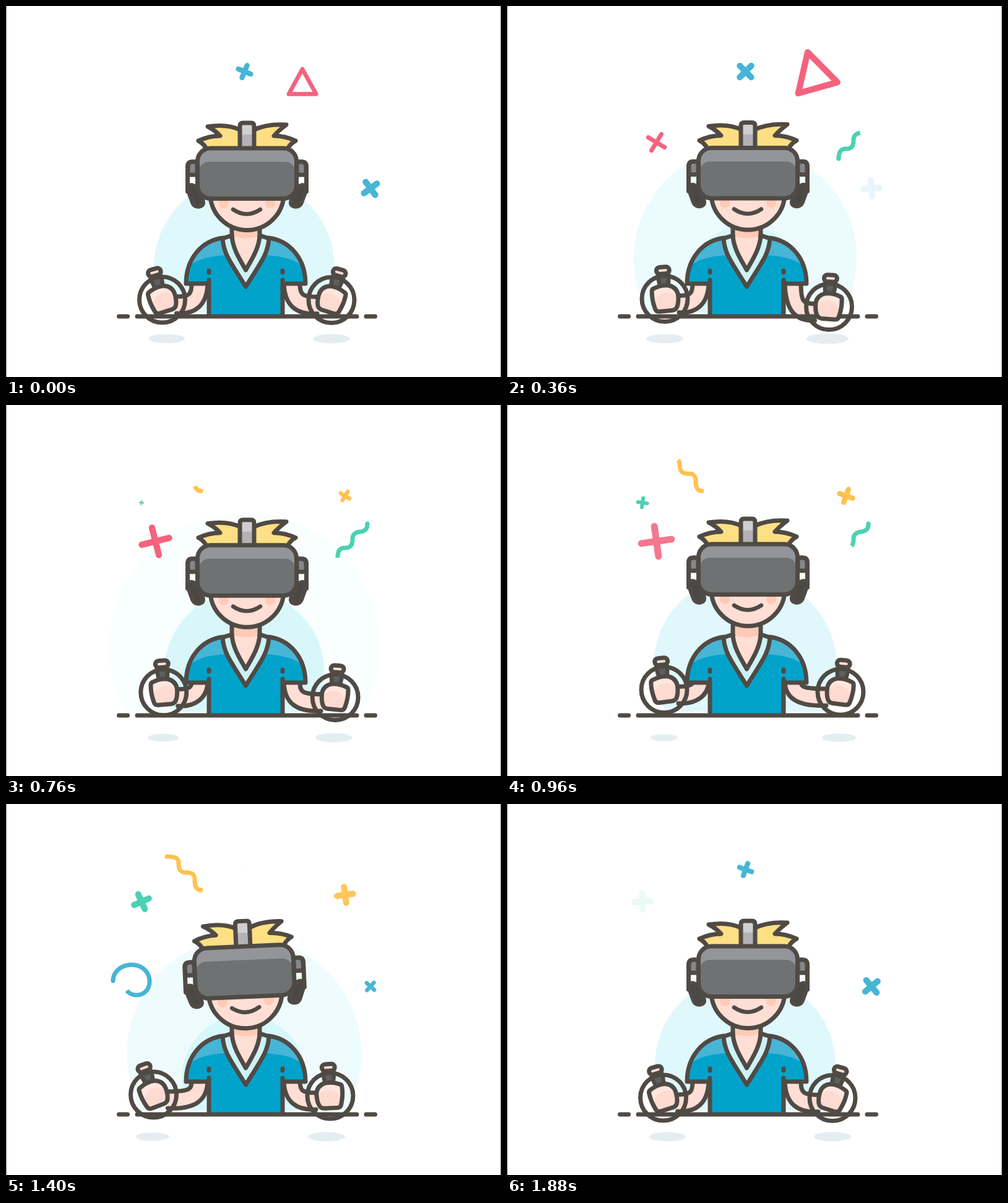
Animation of 800 by 600 pixels, one loop 1920 ms. Source, as an HTML page with a canvas:

```html
<!DOCTYPE html>
<html lang="en">
<head>
<meta charset="utf-8">
<title>VR player</title>
<style>
html, body { margin: 0; width: 100%; height: 100%; overflow: hidden; background: #fff; }
canvas { display: block; }
</style>
</head>
<body>
<canvas id="c" width="800" height="600"></canvas>
<script>
const g = document.getElementById('c').getContext('2d');
const LOOP = 1920, CYCLE = 1880;
const INK = '#504a45', SKIN = '#ffded5', BLUSH = '#ffcab6';
const BLUE = '#47b5d5', PINK = '#f4637e', GREEN = '#4bd1b3', YELLOW = '#ffc250';
const TIMES = [0, 360, 600, 960, 1400, 1720];

const clamp = v => Math.max(0, Math.min(1, v));
const span = (t, a, b) => clamp((t - a) / (b - a));
const ease = p => p * p * (3 - 2 * p);
const easeOut = p => 1 - (1 - p) ** 2;

// Smooth periodic curve through one value per entry of TIMES.
function pose(t, vals) {
  const n = TIMES.length;
  const wrap = i => (i + n) % n;
  const slope = i => {
    const a = wrap(i), b = wrap(i + 1);
    return (vals[b] - vals[a]) / ((TIMES[b] - TIMES[a] + CYCLE) % CYCLE);
  };
  const tangent = i => {
    const a = slope(i - 1), b = slope(i);
    return a * b > 0 ? 2 * a * b / (a + b) : 0;
  };
  t %= CYCLE;
  let i = n - 1;
  while (TIMES[i] > t) i--;
  const j = wrap(i + 1), h = (i === n - 1 ? CYCLE : TIMES[j]) - TIMES[i], u = (t - TIMES[i]) / h;
  const u2 = u * u, u3 = u2 * u;
  return (2 * u3 - 3 * u2 + 1) * vals[i] + (u3 - 2 * u2 + u) * h * tangent(i)
    + (3 * u2 - 2 * u3) * vals[j] + (u3 - u2) * h * tangent(j);
}

// Piecewise linear value from [time, value] pairs.
function line(t, keys) {
  for (let i = 1; i < keys.length; i++) {
    const [a, v] = keys[i - 1], [b, w] = keys[i];
    if (t < b) return v + (w - v) * span(t, a, b);
  }
  return keys[keys.length - 1][1];
}

function shape(d, fill, width = 7, color = INK) {
  const p = typeof d === 'string' ? new Path2D(d) : d;
  if (fill) { g.fillStyle = fill; g.fill(p); }
  if (width) { g.strokeStyle = color; g.lineWidth = width; g.stroke(p); }
}

function box(x, y, w, h, r) {
  const p = new Path2D();
  p.roundRect(x, y, w, h, r);
  return p;
}

function oval(x, y, rx, ry = rx) {
  const p = new Path2D();
  p.ellipse(x, y, rx, ry, 0, 0, 7);
  return p;
}

function scoped(fn) { g.save(); fn(); g.restore(); }

function mirrored(axis, fn) {
  fn(0);
  scoped(() => { g.translate(axis * 2, 0); g.scale(-1, 1); fn(1); });
}

function pulses(t) {
  scoped(() => {
    g.beginPath();
    g.rect(0, 0, 800, 496);
    g.clip();
    for (const lag of [1, 0, -1]) {
      const r = 146 + (t % 940 + lag * 940) * 0.0947;
      if (r < 60 || r > 235) continue;
      g.globalAlpha = clamp((235 - r) / 110);
      shape(oval(385, 485 - r * 0.425, r), '#d8f7fb', 0);
    }
  });
}

function cross(x, y, len, w, deg, alpha, color) {
  if (len <= 0 || alpha <= 0) return;
  scoped(() => {
    g.translate(x, y);
    g.rotate(deg * Math.PI / 180);
    g.globalAlpha = alpha;
    const k = len - w / 2;
    shape(`M0,${-k}V${k}M${-k},0H${k}`, null, w, color);
  });
}

function plus(t, x, y, born, color, turns) {
  const age = (t - born + LOOP) % LOOP;
  const s = line(age, [[0, 0], [330, 0.6], [490, 0.8], [760, 1]]);
  cross(x, y, 18 * s, 10 * s, line(age, turns), span(age, 1280, 980), color);
}

function triangle(t) {
  if (t >= 600 || t >= CYCLE) return;
  const p = easeOut(span(t, 0, 400));
  scoped(() => {
    g.globalAlpha = 1 - span(t, 420, 600);
    g.translate(479 + 18 * p, 129 - 16 * p);
    g.rotate((-16 * p - 4 * span(t, 400, 600)) * Math.PI / 180);
    g.scale(0.67 + 0.33 * p, 0.67 + 0.33 * p);
    shape('M0,-40L33,20H-33Z', null, 10, PINK);
  });
}

// Sampled chain of cubic curves that can be trimmed at both ends.
function chain(x, y, ...curves) {
  const pts = [[x, y]];
  for (const [a, b, c, d, e, f] of curves) {
    const [sx, sy] = pts[pts.length - 1];
    for (let i = 1; i <= 24; i++) {
      const u = i / 24, v = 1 - u;
      const mix = (p, q, r, s) => v ** 3 * p + 3 * v * v * u * q + 3 * v * u * u * r + u ** 3 * s;
      pts.push([mix(sx, a, c, e), mix(sy, b, d, f)]);
    }
  }
  let sum = 0;
  const at = pts.map((p, i) => i ? sum += Math.hypot(p[0] - pts[i - 1][0], p[1] - pts[i - 1][1]) : 0);
  return { pts, at: at.map(v => v / sum) };
}

function trim({ pts, at }, from, to, color) {
  if (to - from < 0.005) return;
  const point = u => {
    let i = 1;
    while (i < at.length - 1 && at[i] < u) i++;
    const k = span(u, at[i - 1], at[i]), [a, b] = [pts[i - 1], pts[i]];
    return [a[0] + (b[0] - a[0]) * k, a[1] + (b[1] - a[1]) * k];
  };
  const part = [point(from), ...pts.filter((p, i) => at[i] > from && at[i] < to), point(to)];
  scoped(() => {
    g.lineCap = 'butt';
    shape('M' + part.join('L'), null, 7, color);
    if (from === 0) shape(oval(...pts[0], 3.5), color, 0);
    if (to === 1) shape(oval(...pts[pts.length - 1], 3.5), color, 0);
  });
}

const waveRight = chain(536, 247, [536, 234, 541, 231, 548, 231], [558, 231, 560, 225, 560, 217],
  [560, 209, 565, 206, 572, 205], [581, 204, 584, 200, 584, 192]);
const waveLeft = chain(315, 139, [309, 139, 305, 135, 305, 124], [305, 116, 303, 111, 293, 111],
  [284, 111, 279, 108, 279, 97], [279, 88, 275, 85, 260, 85]);
const swirl = chain(173, 286, [173, 270, 188, 260, 203, 260], [220, 260, 232, 272, 232, 287],
  [232, 300, 223, 309, 211, 309], [200, 309, 192, 301, 192, 293], [192, 284, 200, 276, 214, 278]);

function icons(t) {
  plus(t, 385.5, 106, 1390, BLUE, [[330, 14], [490, 20], [890, 45], [1130, 60], [1280, 72]]);
  plus(t, 589, 295, 1040, BLUE, [[360, 42], [680, 45], [840, 50], [1240, 86]]);
  plus(t, 219, 158, 635, GREEN, [[325, 98], [765, 66], [1085, 45], [1245, -3]]);
  plus(t, 548, 147, 400, YELLOW, [[200, 40], [560, 20], [1000, -8], [1280, -26]]);
  const s = line(t, [[120, 0], [360, 0.63], [600, 0.87], [960, 1]]);
  cross(241.5, 220.5, 30 * s, 11 * s, line(t, [[120, -5], [360, 31], [600, 71], [960, 82], [1160, 88]]),
    span(t, 1160, 930), PINK);
  triangle(t);
  trim(waveRight, ease(span(t, 760, 1230)), ease(span(t, 120, 480)), GREEN);
  trim(waveLeft, ease(span(t, 1420, 1840)), ease(span(t, 660, 1080)), YELLOW);
  trim(swirl, ease(span(t, 1450, 1860)), ease(span(t, 1130, 1520)), BLUE);
}

// Both arms use left-hand coordinates; the right one is mirrored.
function arms(t) {
  return [
    {
      x: pose(t, [252.5, 255, 255, 254, 238.5, 247.5]),
      y: pose(t, [475, 473.5, 469.5, 460.5, 470, 474.5]),
      turn: pose(t, [-16, -4, -3, -6, -19.5, -17]),
      shade: pose(t, [259.5, 255, 254, 254, 237, 252]),
      rx: pose(t, [29.5, 30, 28, 22, 27, 29])
    },
    {
      x: 775 - pose(t, [526, 520.5, 525, 539, 524, 525.5]),
      y: pose(t, [475.5, 486.5, 481.5, 464, 472, 475]),
      turn: -pose(t, [16, 3, 3, 6, -4, 9]),
      shade: 775 - pose(t, [526, 518, 522.5, 536.5, 518, 522.5]),
      rx: pose(t, [30, 34, 32.5, 27.5, 30, 29.5])
    }
  ];
}

function forearm({ x, y }) {
  const ux = x + 23, uy = y - 5, lx = x + 23, ly = y + 22;
  const top = `M300,448C300,${uy - 4} 297,${uy} ${ux},${uy}`;
  const low = `C305,${ly + 2} 325,${ly - 12} 326,448`;
  shape(`${top}L${lx},${ly}${low}Z`, SKIN, 0);
  shape(`${top}M${lx},${ly}${low}`);
}

function hand({ x, y, turn }) {
  scoped(() => {
    g.translate(x, y);
    shape(oval(0, 0, 37), null);
    g.rotate(turn * Math.PI / 180);
    shape('M-9,-37H9L7,-20H-6Z', '#5d6061', 6.5);
    shape(box(-10.5, -51.5, 21, 11, 5.5), SKIN);
    const palm = new Path2D('M-16,-18Q-4,-23 8,-21Q21,-17 22,-4Q22,8 19,14Q17,19 11,19.5'
      + 'L-10,20Q-16,20 -17,14Q-21,0 -20,-13Q-20,-17 -16,-18Z');
    scoped(() => {
      shape(palm, '#ffe6df', 0);
      g.clip(palm);
      shape(oval(3, 7, 19, 17), '#ffdad0', 0);
    });
    shape(palm);
  });
}

function torso() {
  shape('M365,350H410V376C408,395 397,410 387.5,427C378,410 367,395 365,376Z', SKIN, 0);
  scoped(() => {
    g.beginPath();
    g.rect(365, 350, 45, 30);
    g.clip();
    shape(oval(388, 316, 59.5), BLUSH, 0);
  });
  const shirt = new Path2D('M291,449C291,408 317,379 352,375L387.5,427L423,375'
    + 'C458,379 484,408 484,449H446V500H328V449Z');
  scoped(() => {
    shape(shirt, '#47b5d5', 0);
    g.clip(shirt);
    shape('M285,434C300,408 330,402 387,402C445,402 475,408 490,434V500H285Z', '#02a3cb', 0);
  });
  shape('M350,376L365,371C366,392 378,410 387.5,427C397,410 409,392 410,371L425,376'
    + 'C423,402 412,414 387.5,454C363,414 352,402 350,376Z', '#cdf2f5');
  mirrored(387.5, () => {
    shape('M327,449H291C291,408 317,379 351,375M328,443V499M328,428V431M365,357V375', null);
  });
}

function head(t) {
  scoped(() => {
    g.translate(388, 370 + pose(t, [0, -0.5, -1.5, -5, 0.3, 0.2]));
    g.rotate(pose(t, [0, 0, 0, 0, -2.5, -1.2]) * Math.PI / 180);
    g.translate(-388, -370);

    const face = oval(389.5, 303, 59.5);
    shape(face, SKIN, 0);
    shape(oval(352, 319, 8), BLUSH, 0);
    shape(oval(427, 319, 8), BLUSH, 0);
    shape(face);
    shape('M367,329Q389,344 411,329', null, 6.5);

    mirrored(389.5, right => {
      const tip = right ? 192 : 195;
      shape(`M380,201Q358,190 326,${tip}Q338,201 346,210Q328,210 311,218Q319,222 324,231H380Z`, '#ffdf83');
      shape('M309,252H301Q293.5,252 293.5,260V300', null);
      shape('M309,273H294V260Q294,252 301,252H309Z', '#85888a');
      shape('M301,290Q296,289 294,297L302,319Q305,325 313,324Q320,322 318,315L309,293Z', '#4a4846');
    });

    shape('M378,231V194Q378,189 383,189H396Q401,189 401,194V231Z', '#cfced0', 0);
    shape('M378,208H401V231H378Z', '#b4b2b6', 0);
    shape('M378,231V194Q378,189 383,189H396Q401,189 401,194V231', null);

    const visor = box(309.5, 230, 160, 81.5, 21);
    scoped(() => {
      shape(visor, '#929599', 0);
      g.clip(visor);
      shape(box(311, 252, 157, 80, 17), '#6e7272', 0);
    });
    shape(visor);
  });
}

function draw(t) {
  g.fillStyle = '#fff';
  g.fillRect(0, 0, 800, 600);
  g.lineCap = g.lineJoin = 'round';
  const sides = arms(t);
  const both = fn => mirrored(387.5, i => fn(sides[i]));

  pulses(t % CYCLE);
  icons(t);
  both(a => shape(oval(a.shade, 538, a.rx, a.rx / 4), '#e5edf1', 0));
  both(forearm);
  torso();
  shape('M182.5,502H196.5M212,502H567M582,502H596.5', null);
  both(hand);
  head(t);

  g.fillStyle = '#8c8c8c';
  g.fillRect(0, 0, 1, 600);
  g.fillRect(799, 0, 1, 600);
}

const start = performance.now();
function tick() {
  draw((performance.now() - start) % LOOP);
  requestAnimationFrame(tick);
}
tick();
</script>
</body>
</html>
```
